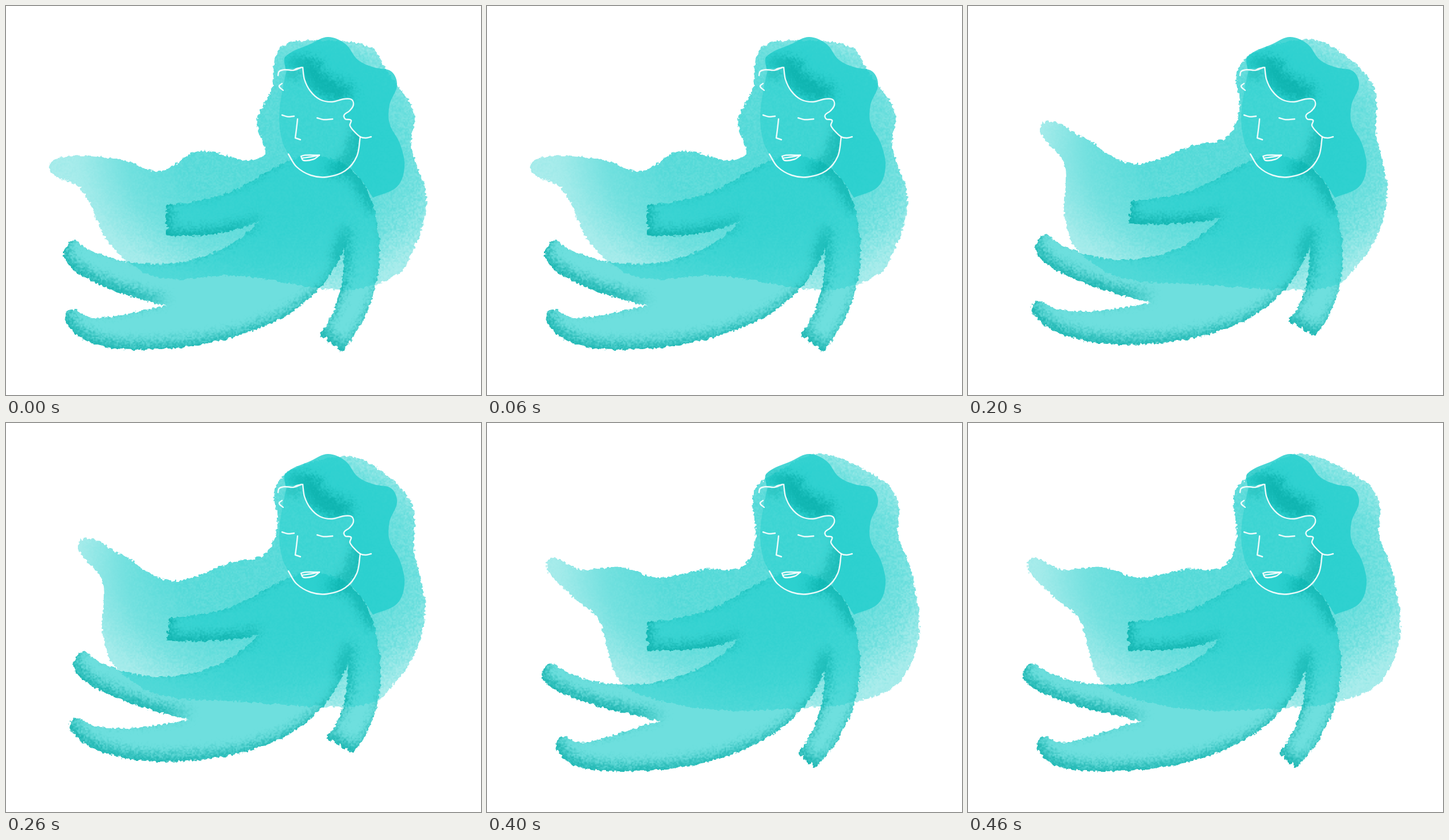
Animation, 826 px wide and 678 px high, one loop 0.5 s. Source, as an HTML page with a canvas:

```html
<!DOCTYPE html>
<html lang="en">
<head>
<meta charset="utf-8">
<title>Reclining figure</title>
<style>
  html, body { margin: 0; width: 100%; height: 100%; overflow: hidden; background: #fff; }
  canvas { display: block; }
</style>
</head>
<body>
<canvas id="stage" width="826" height="678"></canvas>
<script>
const W = 826, H = 678, HOLD = 100;
const TEAL = '#24cfcd', DEEP = '#02a8a3';

// Smooth curve through "x y x y ..."; "|" marks a corner, `closed` joins the ends smoothly.
function curve(points, closed) {
  const path = new Path2D();
  let last;
  for (const part of points.split('|')) {
    const n = part.trim().split(/\s+/).map(Number), p = last ? [last] : [];
    for (let i = 0; i < n.length; i += 2) p.push([n[i], n[i + 1]]);
    const at = i => closed ? p[(i + p.length) % p.length] : p[Math.min(p.length - 1, Math.max(0, i))];
    const handle = (i, length) => {
      const dx = at(i + 1)[0] - at(i - 1)[0], dy = at(i + 1)[1] - at(i - 1)[1], k = length / 3 / (Math.hypot(dx, dy) || 1);
      return [dx * k, dy * k];
    };
    if (!last) path.moveTo(...p[0]);
    for (let i = 0; i < p.length - (closed ? 0 : 1); i++) {
      const a = at(i), b = at(i + 1), length = Math.hypot(b[0] - a[0], b[1] - a[1]);
      const u = handle(i, length), v = handle(i + 1, length);
      path.bezierCurveTo(a[0] + u[0], a[1] + u[1], b[0] - v[0], b[1] - v[1], ...b);
    }
    last = p[p.length - 1];
  }
  return path;
}

const off = ([x, y], dx, dy) => [x + dx, y + dy];

// Four fingertips between two points, bulging outward.
function fingers([ax, ay], [bx, by]) {
  const dx = (bx - ax) / 4, dy = (by - ay) / 4, k = 8 / Math.hypot(dx, dy);
  let d = '';
  for (let i = 0; i < 4; i++)
    d += `Q${ax + dx * (i + .5) + dy * k},${ay + dy * (i + .5) - dx * k} ${ax + dx * (i + 1)},${ay + dy * (i + 1)} `;
  return d;
}

// The neck stays put; limbs follow their joints.
function bodyPath([hand, wrist, pit, upperFoot, crotch, lowerFoot, belly, sidePit, tips, palm]) {
  return new Path2D(`M${hand} C${off(hand, 119, -4)} 435,292 495,268
    C530,252 595,260 625,315 C660,385 668,500 ${tips} ${fingers(tips, palm)}
    C${off(palm, 28, -30)} ${off(sidePit, 0, 59)} ${sidePit}
    C${off(sidePit, -43, 124)} ${off(belly, 160, 0)} ${belly}
    C${off(belly, -80, 0)} ${off(lowerFoot, 10, 35)} ${lowerFoot}
    Q${off(lowerFoot, 2, -15)} ${off(lowerFoot, 18, -13)}
    C${off(lowerFoot, 50, 14)} ${off(crotch, -78, 16)} ${crotch}
    C${off(crotch, -108, -24)} ${off(upperFoot, -31, 37)} ${upperFoot}
    Q${off(upperFoot, 10, -20)} ${off(upperFoot, 26, -1)}
    C${off(upperFoot, 84, 37)} ${off(pit, -100, 105)} ${pit}
    Q${off(pit, -60, wrist[1] - pit[1] + 3)} ${wrist} ${fingers(wrist, hand)}Z`);
}

// Each veil runs from its lower left, over tail and crown, down the right side.
const rest = [[286, 346], [286, 390], [438, 379], [125, 412], [313, 516], [119, 515], [240, 581], [595, 421], [571, 597], [538, 570]];
const poses = [
  {
    joints: [[281, 346], [283, 401], [440, 375], [106, 418], [278, 522], [102, 542], [230, 599], [588, 421], [586, 601], [547, 570]],
    veil: '185 420 130 318 75 283 115 261 210 270 268 288 335 253 445 264 436 200 462 145 475 75 530 60 635 72 660 110 709 185 705 245 731 340'
  },
  {
    joints: rest,
    veil: '205 415 165 305 107 245 140 237 235 260 280 281 372 245 468 240 453 165 482 113 510 72 575 57 662 88 685 155 722 230 711 285 721 375'
  },
  {
    joints: [[286, 339], [284, 380], [440, 369], [122, 409], [318, 517], [110, 528], [270, 590], [594, 419], [605, 573], [558, 546]],
    veil: '190 425 169 370 167 275 128 207 200 229 285 275 390 244 450 228 472 180 468 115 500 80 590 58 645 78 705 140 710 225 729 320 712 400'
  },
  {
    joints: rest,
    veil: '205 425 192 345 150 265 157 200 176 208 220 250 320 271 385 244 445 246 455 180 483 85 515 62 630 67 688 105 695 150 729 225 717 275 733 375'
  },
  {
    joints: [[281, 346], [282, 397], [438, 376], [100, 428], [302, 520], [119, 560], [240, 607], [587, 430], [573, 599], [542, 573]],
    veil: '225 440 192 340 145 300 105 240 165 256 235 251 295 269 380 255 445 250 467 200 464 120 500 88 580 54 690 102 715 140 715 195 738 260 751 375'
  }
];

// The hem is shared and sags a little more with every pose.
function veilPath(veil, i) {
  const right = veil.split(' ').at(-2) - 38;
  return curve(`${veil} ${right} 455 645 485 575 495 400 ${470 + 7.5 * i} 265 473`, true);
}

const jaw = '491 258 505 280 530 295 558 298 590 287 610 262 616 228';
const fringe = '605 218 598 208 600 199 590 197 588 190 597 183 604 173 601 163 588 162 567 167 546 163 529 148 519 128 516 107';
const head = curve(`488 111 480 150 475 195 480 235 ${jaw}|${fringe}`);
const hair = curve('486 110 486 88 530 66 560 54 590 66 612 94 640 107 670 114 680 138 667 172 667 205 685 240 693 280 680 315 638 334' +
  `|620 306 600 283|612 258 616 228|${fringe}`);
const faceLines = [jaw, `635 228 625 230 616 228 ${fringe}`, '473 121 475 114 485 111 500 112 514 107|506 109 500 112',
  '480 135 475 140 482 147', '480 190 490 193 501 192', '541 195 552 198 568 197', '507 197 505 215 503 230|512 233',
  '513 262 520 260 545 260|535 267 517 269 513 262', '516 265 530 263 545 260'].map(line => curve(line));

function layer(paint) {
  const canvas = document.createElement('canvas');
  canvas.width = W;
  canvas.height = H;
  const c = canvas.getContext('2d', { willReadFrequently: true });
  c.fillStyle = TEAL;
  c.lineCap = c.lineJoin = 'round';
  paint(c);
  return canvas;
}

// Smooth value noise in -1..1 over the whole stage.
function noise(size, seed) {
  const cols = Math.ceil(W / size) + 2, rows = Math.ceil(H / size) + 2;
  const grid = Float32Array.from({ length: cols * rows }, () => {
    seed = (Math.imul(seed, 1664525) + 1013904223) >>> 0;
    return seed / 2 ** 31 - 1;
  });
  const field = new Float32Array(W * H);
  for (let y = 0, i = 0; y < H; y++) for (let x = 0; x < W; x++, i++) {
    const gx = Math.floor(x / size), gy = Math.floor(y / size), u = x / size - gx, v = y / size - gy;
    const k = gy * cols + gx;
    const top = grid[k] + (grid[k + 1] - grid[k]) * u;
    const low = grid[k + cols] + (grid[k + cols + 1] - grid[k + cols]) * u;
    field[i] = top + (low - top) * v;
  }
  return field;
}

const wobble = [noise(3, 7), noise(3, 19)], speckle = [noise(2.3, 31), noise(2.3, 43)];

// Shifts every pixel by noise and thins its alpha, like dry paint on paper.
function roughen(canvas, [nx, ny], reach, grain) {
  const c = canvas.getContext('2d'), image = c.getImageData(0, 0, W, H);
  const from = new Uint32Array(image.data.slice().buffer), to = new Uint32Array(image.data.buffer);
  for (let y = 0, i = 0; y < H; y++) for (let x = 0; x < W; x++, i++) {
    const sx = Math.min(W - 1, Math.max(0, Math.round(x + nx[i] * reach)));
    const sy = Math.min(H - 1, Math.max(0, Math.round(y + ny[i] * reach)));
    to[i] = from[sy * W + sx];
    image.data[i * 4 + 3] *= 1 - grain * (speckle[0][i] + 1) / 2;
  }
  c.putImageData(image, 0, 0);
  return canvas;
}

const silhouette = (path, reach) => roughen(layer(c => c.fill(path)), wobble, reach, 0);

// Shade along the lower edges of a path.
const underside = path => layer(c => {
  c.fillStyle = DEEP;
  c.fillRect(0, 0, W, H);
  c.globalCompositeOperation = 'destination-out';
  c.filter = 'blur(9px)';
  c.translate(7, -11);
  c.fill(path);
});

const softStrokes = strokes => layer(c => {
  c.strokeStyle = DEEP;
  c.filter = 'blur(9px)';
  for (const [width, points] of strokes) {
    c.lineWidth = width;
    c.stroke(curve(points));
  }
});

function shape(path, alpha, reach, shades) {
  return layer(c => {
    c.globalAlpha = alpha;
    c.fillRect(0, 0, W, H);
    c.globalAlpha = .75;
    for (const shade of shades) c.drawImage(roughen(shade, speckle, 9, .15), 0, 0);
    c.globalAlpha = 1;
    c.globalCompositeOperation = 'destination-in';
    c.drawImage(silhouette(path, reach), 0, 0);
  });
}

function bodyShape(joints) {
  const path = bodyPath(joints), [x, y] = joints[7];
  return shape(path, .66, 2.4, [underside(path),
    softStrokes([[20, '560 280 600 290 636 345'], [16, `${x + 2} ${y - 25} ${x - 12} ${y + 20}`]])]);
}

// Dense paint near the shoulders, thin towards the rim.
const wash = roughen(layer(c => {
  const gradient = c.createRadialGradient(0, 0, 0, 0, 0, 255);
  [[0, .82], [.5, .8], [.75, .69], [1, .44]].forEach(([at, a]) => gradient.addColorStop(at, `rgba(36,207,205,${a})`));
  c.translate(465, 255);
  c.scale(1.35, 1);
  c.fillStyle = gradient;
  c.fillRect(-W, -H, 2 * W, 2 * H);
}), speckle, 20, .14);

const veilShape = path => layer(c => {
  c.drawImage(wash, 0, 0);
  c.globalCompositeOperation = 'destination-in';
  c.drawImage(silhouette(path, 2.4), 0, 0);
});

const headShape = shape(head, .5, 0, [softStrokes([[20, '616 210 604 255 578 288'], [12, '492 118 512 114']])]);
const hairShape = shape(hair, .84, 0, [softStrokes([[34, '528 108 550 138 585 150'], [14, '494 100 520 100']])]);

const pictures = poses.map(({ joints, veil }, i) => layer(c => {
  c.fillStyle = '#fff';
  c.fillRect(0, 0, W, H);
  for (const part of [veilShape(veilPath(veil, i)), bodyShape(joints), headShape, hairShape]) c.drawImage(part, 0, 0);
  c.strokeStyle = 'rgba(255,255,255,.9)';
  c.lineWidth = 2.4;
  faceLines.forEach(line => c.stroke(line));
}));

const stage = document.getElementById('stage').getContext('2d');
function draw() {
  stage.drawImage(pictures[Math.floor(performance.now() / HOLD) % pictures.length], 0, 0);
  requestAnimationFrame(draw);
}
draw();
</script>
</body>
</html>
```
